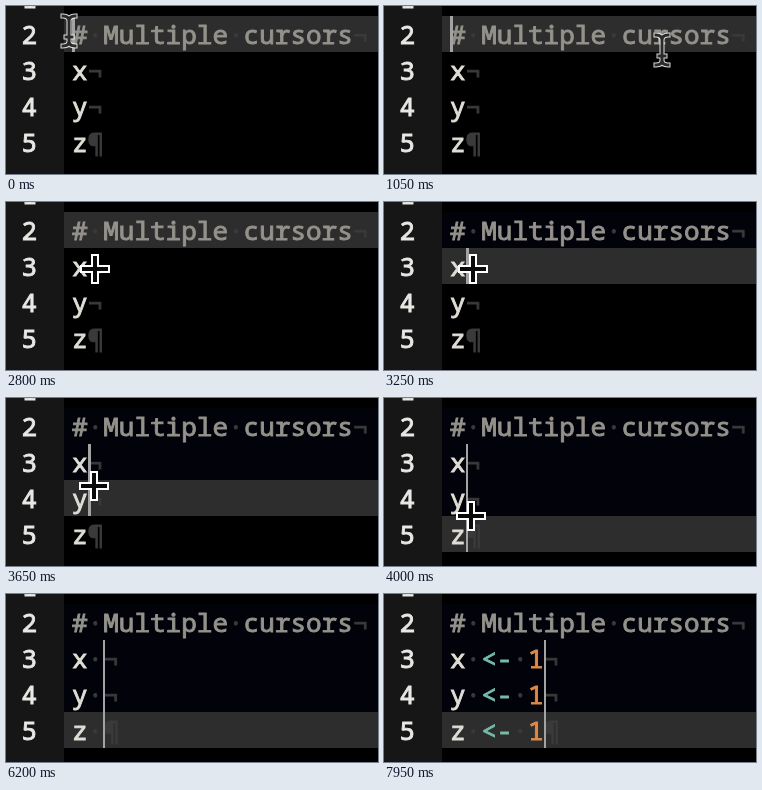
Recreate the animation shown at these times as an HTML page with a canvas. Size 372 by 168 pixels, loop 8 s.

```html
<!DOCTYPE html>
<html lang="en">
<head>
<meta charset="utf-8">
<title>Multiple cursors</title>
<style>
html, body { margin: 0; width: 100%; height: 100%; overflow: hidden; background: #000; }
canvas { display: block; }
</style>
</head>
<body>
<canvas id="stage" width="372" height="168"></canvas>
<script>
const ctx = document.getElementById('stage').getContext('2d');
const LOOP = 8000, W = 372, H = 168;
const LEFT = 66, CHAR = 15.6, ROW = 36, GUTTER = 58, BLINK = 500;
const FONT = '26px "Noto Sans Mono", "DejaVu Sans Mono", monospace';
const C = {
  back: '#000', visited: '#01020a', gutter: '#161616', active: '#2d2d2d',
  number: '#e8e8e5', text: '#e0ded6', comment: '#94928b', hidden: '#3a3a3a',
  op: '#74bca8', digit: '#e08a48', caret: '#a3a3a3'
};

const ALT_DOWN = 1550, CLICK = 3250, ALT_UP = 5100;
const KEYS = ' <- 1', KEY_TIMES = [6200, 6900, 7050, 7250, 7500];
const BLINK_RESETS = [50, 3550, 6050, ...KEY_TIMES];

// Pointer moves after it has left at the upper left: start, end, x, y
const MOVES = [
  [600, 750, 278, 44],
  [ALT_DOWN, 1650, 69, 67],
  [1850, 2350, 89, 67],
  [CLICK, 4300, 87, 131]
];

const rowTop = line => 10 + (line - 2) * ROW;
const column = n => LEFT + n * CHAR;
const lerp = (a, b, k) => a + (b - a) * k;

function ease(t, start, end) {
  const k = Math.max(0, Math.min(1, (t - start) / (end - start)));
  return k * k * (3 - 2 * k);
}

function pointerAt(t) {
  let x = 63, y = 25;
  if (t < MOVES[0][0]) {
    const k = ease(t, 25, 150);
    return [lerp(x, -40, k), lerp(y, -30, k)];
  }
  for (const [start, end, toX, toY] of MOVES) {
    const k = ease(t, start, end);
    x = lerp(x, toX, k);
    y = lerp(y, toY, k);
  }
  return [Math.round(x), Math.round(y)];
}

function caretOn(t) {
  const since = BLINK_RESETS.filter(r => r <= t).pop() || 0;
  return Math.floor((t - since) / BLINK) % 2 === 0;
}

// A thin stroke gives the heavier look of smoothed screen text
function glyph(ch, x, line, color) {
  const y = rowTop(line) + 28;
  ctx.fillStyle = ctx.strokeStyle = color;
  ctx.lineWidth = 0.9;
  ctx.fillText(ch, x, y);
  ctx.strokeText(ch, x, y);
}

function write(str, line, colorOf) {
  [...str].forEach((ch, i) => {
    if (ch === ' ') glyph('·', column(i), line, C.hidden);
    else glyph(ch, column(i), line, colorOf(ch));
  });
  glyph(line === 5 ? '¶' : '¬', column(str.length), line, C.hidden);
}

function codeColor(ch) {
  if (ch === '<' || ch === '-') return C.op;
  return ch === '1' ? C.digit : C.text;
}

function outline(path, outer, inner) {
  ctx.lineCap = 'square';
  for (const [color, width] of [['#fff', outer], ['#0a0a0a', inner]]) {
    ctx.strokeStyle = color;
    ctx.lineWidth = width;
    ctx.stroke(path);
  }
}

function crosshair(x, y) {
  const p = new Path2D();
  p.moveTo(x - 11, y); p.lineTo(x + 11, y);
  p.moveTo(x, y - 11); p.lineTo(x, y + 11);
  outline(p, 8, 4);
}

function ibeam(x, y) {
  const p = new Path2D();
  for (const s of [-1, 1]) {
    p.moveTo(x - 6, y + s * 15);
    p.quadraticCurveTo(x, y + s * 15, x, y + s * 10);
    p.quadraticCurveTo(x, y + s * 15, x + 6, y + s * 15);
  }
  p.moveTo(x, y - 10); p.lineTo(x, y + 10);
  p.moveTo(x - 3, y + 6); p.lineTo(x + 3, y + 6);
  ctx.globalAlpha = 0.85;
  outline(p, 5, 3);
  ctx.globalAlpha = 1;
}

function band(color, line, count) {
  ctx.fillStyle = color;
  ctx.fillRect(GUTTER, rowTop(line), W - GUTTER, count * ROW);
}

function draw(t) {
  const [mx, my] = pointerAt(t);
  const typed = KEYS.slice(0, KEY_TIMES.filter(k => k <= t).length);
  const clicked = t >= CLICK;
  const active = clicked ? Math.floor((my - rowTop(2)) / ROW) + 2 : 2;

  ctx.fillStyle = C.back;
  ctx.fillRect(0, 0, W, H);
  ctx.fillStyle = C.gutter;
  ctx.fillRect(0, 0, GUTTER, H);
  band(C.visited, 2, active - 2);
  band(C.active, active, 1);

  ctx.font = FONT;
  for (let n = 1; n <= 5; n++) glyph(String(n), 15.5, n, C.number);
  write('# Multiple cursors', 2, () => C.comment);
  ['x', 'y', 'z'].forEach((name, i) => write(name + typed, i + 3, codeColor));

  if (caretOn(t)) {
    const first = clicked ? 3 : 2;
    const x = clicked ? Math.round(column(1 + typed.length)) : LEFT;
    ctx.fillStyle = C.caret;
    ctx.fillRect(x, rowTop(first), active < 5 ? 3 : 2, (active - first + 1) * ROW);
  }

  if (t >= ALT_DOWN && t < ALT_UP) crosshair(mx, my);
  else if (t < KEY_TIMES[0]) ibeam(mx, my);
}

function tick() {
  draw(performance.now() % LOOP);
  requestAnimationFrame(tick);
}
tick();
</script>
</body>
</html>
```
